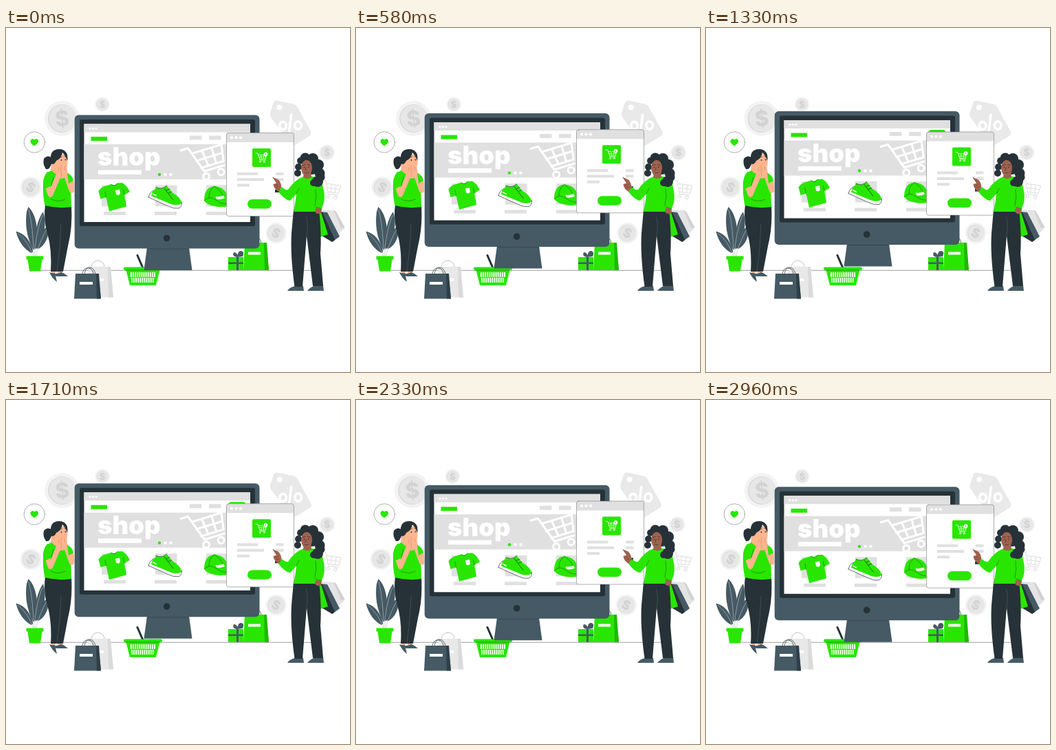
Animation, 500 px wide and 500 px high, one loop 3 s. Source, as an HTML page:

```html
<!DOCTYPE html>
<html lang="en">
<head>
<meta charset="utf-8">
<title>Online shop</title>
<style>
html, body { margin: 0; width: 100%; height: 100%; overflow: hidden; background: #fff; }
svg { display: block; width: 100%; height: 100%; }
.g { fill: #29e600; }
.s { fill: #455a64; }
.d { fill: #263238; }
.l { fill: #e0e0e0; }
.w { fill: #fff; }
.peach { fill: #ffb58e; }
.brown { fill: #a0624e; }
.line { fill: none; stroke: #263238; stroke-width: .7; stroke-linecap: round; stroke-linejoin: round; }
.thin { stroke: #777; stroke-width: .6; }
.fold { fill: none; stroke: #167d05; stroke-width: .7; stroke-linecap: round; }
text { font-family: Inter, "Open Sans", sans-serif; }
</style>
</head>
<body>
<svg viewBox="0 0 500 500">
  <defs>
    <g id="cart" fill="none" stroke-linejoin="round" stroke-linecap="round">
      <path d="M0 0H11L24 39H54M14 9H59L55 33H21M17 21H57M29 9L32 33M44 9V33"/>
      <circle cx="24.5" cy="47" r="4.5"/><circle cx="47" cy="47" r="4.5"/>
    </g>
    <g id="coin">
      <circle r="25.5" fill="#f3f3f3"/>
      <circle r="20.5" fill="#dadada"/>
      <circle cx=".8" r="19.7" fill="#e7e7e7"/>
      <text y="11" font-size="31" font-weight="800" text-anchor="middle" fill="#d3d3d3">$</text>
    </g>
  </defs>

  <path class="line" d="M36 352.3H452" style="stroke:#777"/>

  <g id="drift">
    <use href="#coin" transform="translate(81.5 131.5) rotate(-6)"/>
    <use href="#coin" transform="translate(140 111) scale(.42)"/>
    <use href="#coin" transform="translate(36 231.5) rotate(28) scale(.61)"/>
    <use href="#coin" transform="translate(392.5 298) rotate(24) scale(.6)"/>
    <use href="#coin" transform="translate(466.5 181) scale(.45)"/>
    <use href="#cart" transform="translate(459.500 221) rotate(8) scale(.48)" stroke="#e2e2e2" stroke-width="2.6"/>
    <path d="M394 105.5L418 110.500Q421 111 423 114L443 150Q445 154 441 157L420 170Q416 172 413 168L385 130Q383 127 384 123L389 108Q390.500 105 394 105.500Z" fill="#e9e9e9"/>
    <circle class="w" cx="397.500" cy="115.500" r="4"/>
    <g fill="none" stroke="#fff" stroke-width="3.600" stroke-linecap="round">
      <ellipse cx="402.500" cy="142" rx="4.800" ry="5.600"/>
      <ellipse cx="424.500" cy="141.500" rx="4.800" ry="5.600"/>
      <path d="M414.500 126L411.500 150"/>
    </g>
  </g>

  <!-- gift and bag behind the screen -->
  <path class="line" d="M354 313Q355 301 362 304Q370 303 371 313"/>
  <path class="g" d="M347 312H378L382 352H345Z"/>
  <path d="M375 312H379L382 352H376Z" fill="#1fb800"/>
  <path class="w" d="M352 325.500H370V329.500H352Z"/>
  <path class="g" d="M323 333H345V352H323Z"/>
  <path class="s" d="M323 340.500H345V343H323ZM335 333H338V352H335ZM336 333Q328 332 331 326Q335 326 336.500 330Q338 323 342 324Q347 325 344 332Z"/>

  <!-- plant -->
  <g class="s">
    <path d="M39 322Q26 295 30 267L32.500 260Q43 270 45 292Q45 310 41.500 322Z"/>
    <path d="M42 322Q41 285 54 267Q62 292 45 320Z"/>
    <path d="M37 327Q20 318 14.500 295.500Q33 300 39.500 325Z"/>
    <path d="M45 322Q45 298 62 287Q63 312 47 321Z"/>
  </g>
  <path d="M40 331Q40 292 33 264M41 331Q43 298 53 272M39 331Q34 312 17 298M43 331Q50 308 60 291" fill="none" stroke="#d7dcde" stroke-width=".5"/>
  <path d="M39.500 332V322M42 332V320M44 332L46 320" stroke="#e0e0e0" stroke-width="1.200"/>
  <path class="g" d="M29.500 331.500H54.500V336.500H52.500L50 353.500H34L31.500 336.500H29.500Z"/>

  <circle class="line thin" cx="41.300" cy="166" r="15.200"/>
  <path class="g" d="M41 171.500Q34.500 167 35.500 163.500Q38 159 41.300 162.500Q45 159 47 163.500Q48 167 41 171.500Z"/>

  <!-- surprised woman -->
  <path class="peach" d="M66 350H72L71 358H66ZM75 350H82L80 358H75Z"/>
  <path class="s" d="M68 357Q76 358 80 354.500Q86 357 90 361H73ZM63 355Q68 357 71 356L74 369Q67 364 63 355Z"/>
  <path class="d" d="M57 257H95Q97 290 90 317L83 354H65Q67 322 60 298Q54 278 57 257Z"/>
  <path d="M80 285Q79 320 74 354" fill="none" stroke="#455a64" stroke-width=".7"/>
  <path class="peach" d="M66 196L76 199L78 213Q70 214 65 208Z"/>
  <path class="g" d="M66 207Q72 214 79 213L88 209Q93 212 94 224L95 260Q76 263 56.500 258Q53 243 54 224Q55 211 66 207Z"/>
  <path class="peach" d="M68 188Q80 179 89 186Q91 200 86 209L75 209Q70 203 67 197Z"/>
  <path class="d" d="M55 190Q60 184 66 188Q68 196 64 202Q62 206 58 205Q53 198 55 190Z"/>
  <path class="d" d="M65 190Q64 179 73 176.500Q85 174 89 184Q90 189 89 193Q87 186 82 181Q80 190 73 193Q71 198 67 198Q64 196 65 190Z"/>
  <g class="d"><circle cx="80.500" cy="192" r=".9"/><circle cx="86.500" cy="191.500" r=".9"/></g>
  <path class="line" d="M78 188.500L81.500 187M85 186.500L88 188"/>
  <path d="M61 232L64.500 242L77 213M95 225L95.500 236L87 212" fill="none" stroke="#ffb58e" stroke-width="7.500" stroke-linecap="round" stroke-linejoin="round"/>
  <path class="peach" d="M72 207Q76 198 82 197Q88 199 89 206L89 215Q81 222 73 216Z"/>
  <path d="M80.500 199Q79 207 81 216M77 202L76 208M85 201L86 207" fill="none" stroke="#d98e6b" stroke-width=".7"/>
  <path class="g" d="M60 209Q67 209 69 215L66 229L55 235Q52 218 60 209ZM89 211Q97 214 98 222L91 226Z"/>
  <path class="fold" d="M66 229L69 217M66 249Q76 254 86 249"/>

  <!-- bags and basket -->
  <path class="line" d="M124 348Q125 338 134 338Q143 339 143 348" style="stroke:#aaa"/>
  <path d="M120 347H152L156 391.500H117Z" fill="#e8e8e8"/>
  <path d="M148 347H152L156 391.500H149Z" fill="#dadada"/>
  <path class="w" d="M126 364H142V368H126Z"/>
  <path class="line" d="M111 357Q113 348 119 349Q126 349 127 357M114 357Q116 347 122 348Q128 349 130 357"/>
  <path class="s" d="M101 357H134L138 393.500H99Z"/>
  <path d="M131 357H135L138 393.500H132Z" fill="#2f3f48"/>
  <path class="w" d="M107 369H126V373H107Z"/>
  <path class="g" d="M174 350H224L218 374H180Z"/>
  <path d="M181 358.500H217M182 366.500H216" fill="none" stroke="#fff" stroke-width="7" stroke-dasharray="1.800 1.300"/>
  <path d="M191 330.500L199.500 350" stroke="#263238" stroke-width="3" stroke-linecap="round"/>
  <rect class="g" x="171" y="347.500" width="56" height="4.500" rx="2"/>
  <path class="fold" d="M174 352H223"/>

  <g id="screen">
    <path class="s" d="M205 319H266L270.500 352H200.500Z"/>
    <path d="M205 320.500H266L266.200 321.500H204.800Z" fill="#37474f"/>
    <rect class="s" x="99.700" y="126.500" width="268.800" height="194" rx="6"/>
    <rect class="d" x="107" y="133" width="255" height="155" rx="3"/>
    <path class="w" d="M113.500 139.500H355V282H113.500Z"/>
    <path class="l" d="M113.500 139.500H355V151.500H113.500ZM113.500 169H355V220H113.500ZM267 156.500H284.500V162.500H267ZM295 156.500H312.500V162.500H295Z"/>
    <g class="w"><circle cx="122" cy="146" r="1.600"/><circle cx="126.500" cy="146" r="1.600"/><circle cx="131" cy="146" r="1.600"/></g>
    <path class="g" d="M123.500 158H147V164H123.500Z"/>
    <rect class="g" x="324" y="153.500" width="24" height="10" rx="3"/>
    <text class="w" x="133" y="200.500" font-size="36.500" font-weight="900">shop</text>
    <path class="w" d="M134 206.500H197V213H134Z"/>
    <circle class="g" cx="223" cy="213" r="2.200"/>
    <circle class="w" cx="231.500" cy="213" r="2.200"/><circle class="w" cx="239.500" cy="213" r="2.200"/>
    <use href="#cart" transform="translate(254 178) rotate(-17)" stroke="#fff" stroke-width="3"/>
    <path class="l" d="M139 228.500H175V259H139ZM217 228.500H248.500V259H217ZM291 228.500H323V259H291ZM142 267H174V272H142ZM216 267H248V272H216ZM291 267H323V272H291Z"/>
    <!-- shirt, shoe, cap -->
    <path class="g" d="M145 229.500L153 227Q158 230 162 225.500L169 225Q176 229 180 238L172 242.500L175 259.500L150 266.500L145.500 246L137.500 248.500L134.500 237Q138 231 145 229.500Z"/>
    <path class="fold" d="M153 227Q158 232 162 225.500M145.500 246L144 238M172 242.500L170.500 235"/>
    <path class="w" d="M159 236L165 234.500L166 241L163.500 243L160 242Z"/>
    <path class="w" d="M207 246Q209 238 215 236L240 250L255.500 253Q256 260 251 262Q244 263 236 259Z"/>
    <path class="line" d="M207 246Q209 238 215 236M207 246L236 259Q244 263 251 262Q256 260 255.500 253"/>
    <path class="g" d="M212.500 238.500Q217 234 218 231.500Q227 236 233.500 229L241.500 239Q254 246 255.500 255Q249 259 240 256L211 244Z"/>
    <path class="line" d="M218 231.500Q227 236 233.500 229M230 233L243 250M233 236L238 234M236 240L241 238"/>
    <path d="M213 241L219 244" stroke="#fff" stroke-width="1.500"/>
    <path class="g" d="M288 251Q288 231 303 230Q319 231 322 246L326 258Q315 262 303 259Q292 257 288 251Z"/>
    <path class="fold" d="M288 251Q296 243 305 250Q315 258 326 255M303 230Q294 236 295 247M303 230Q312 236 315 243"/>
    <path class="w" d="M304.500 245Q311 246 316 243.500L318 247Q312 250 306 248.500Z"/>
    <circle class="d" cx="233.700" cy="305.500" r="4.800"/>
  </g>

  <g id="popup">
    <rect class="w" x="320.500" y="152.500" width="98" height="121" rx="3"/>
    <path class="l" d="M320.500 166V155.500Q320.500 152.500 323.500 152.500H415.500Q418.500 152.500 418.500 155.500V166Z"/>
    <rect class="line thin" x="320.500" y="152.500" width="98" height="121" rx="3"/>
    <g class="w"><circle cx="328" cy="159.300" r="2.100"/><circle cx="334.500" cy="159.300" r="2.100"/><circle cx="341" cy="159.300" r="2.100"/></g>
    <rect class="g" x="358" y="175" width="27" height="27" rx="2"/>
    <use href="#cart" transform="translate(363 182) scale(.26)" stroke="#fff" stroke-width="2.800"/>
    <circle class="w" cx="377.500" cy="183.500" r="2.800"/>
    <path class="g" d="M377 182H378V185H377Z"/>
    <path class="l" d="M336 210H366V214H336ZM336 218.300H375V222.300H336ZM336 226.600H354V230.600H336ZM392 210H403.500V214H392ZM392 218.300H403.500V222.300H392Z"/>
    <path class="d" d="M391 235H403V239H391Z"/>
    <rect class="g" x="351" y="249" width="35" height="13.500" rx="6.700"/>
  </g>

  <!-- shopper -->
  <path d="M458 264L478 265L492 291L484 299Z" fill="#e4e4e4"/>
  <path d="M476 264L480 267L492.500 290L487 291Z" fill="#d2d2d2"/>
  <path class="s" d="M457 267L467 268L485 303L474 311Z"/>
  <path class="d" d="M455 267L460 268L478 308L474 311L459 302Z"/>
  <path class="g" d="M453 267L458 268L468 300L456 304Z"/>
  <path class="s" d="M409 382Q412 377 420 375H432L433 382ZM438 382Q442 377 449 374L461 374L462 382Z"/>
  <path class="d" d="M418 264H455Q459 300 457 328L461 375H446L437 302L431 376H419.500Q413 330 415 298Z"/>
  <path d="M437 302Q440 284 436 274" fill="none" stroke="#455a64" stroke-width=".7"/>
  <path class="g" d="M432 216Q447 213 456 221Q460 225 461 232Q464 244 462 254L458 265L454 267H418Q421 252 422 241L413 251Q405 250 396 238L401 231Q406 236 410 235Q419 221 432 216Z"/>
  <path class="fold" d="M422 241L426 233M450 234Q452 246 449 258M450 260L459 263"/>
  <path class="brown" d="M450 262Q456 260 459 265L457 270Q452 271 449 267Z"/>
  <g id="hair" class="d"></g>
  <path class="brown" d="M433 208H443L444 217Q438 221 432 217Z"/>
  <ellipse class="brown" cx="437" cy="203.500" rx="8" ry="11.500"/>
  <path class="d" d="M428 200Q426 188 437 188Q448 190 447 206L452 214L457 195L441 184L427 189Z"/>
  <g class="d"><circle cx="433.500" cy="202.500" r=".8"/><circle cx="440" cy="202.500" r=".8"/></g>
  <path class="line" d="M431 199.500L435 198.500M438.500 198.500L442 199.500M436 203L435 207M434.500 210.500Q437 211.500 439.500 210"/>
  <path class="brown" d="M387 216.500L396 220.500Q400 225 400.500 231L396.500 238Q389 234 388.500 227L393 225.500Z"/>
  <path d="M391 229L395 228M393 232L397 230.500" stroke="#6f3d30" stroke-width=".6"/>
</svg>
<script>
const $ = id => document.getElementById(id);

// curls as [x, y, radius]
const curls = [[435, 189, 7.5], [446, 190, 8], [454, 199, 8], [456, 211, 7.5], [453, 223, 8],
  [428, 193, 5], [425, 202, 5], [424, 211, 5], [444, 202, 11], [458, 217, 5.5], [447, 225, 5]];
$("hair").innerHTML = curls.map(([x, y, r]) => `<circle cx="${x}" cy="${y}" r="${r}"/>`).join("");

const move = (id, x, y) => $(id).setAttribute("transform", `translate(${x} ${y})`);

// Steady rise and fall, 0 to 1 and back
const bob = (t, period) => 1 - Math.abs(1 - 2 * (t % period) / period);

// Sideways shake: offsets at each tenth of the cycle, joined by straight ramps
const shakes = [0, -1, 2, -4, 4, -4, 4, -4, 2, -1, 0];
function shake(t, period) {
  const p = t % period / period * 10, i = Math.floor(p);
  return shakes[i] + (shakes[i + 1] - shakes[i]) * (p - i);
}

function draw() {
  const t = performance.now() % 3000;
  move("screen", 0, -6.2 * bob(t, 3000));
  move("popup", 0, -6.2 * bob(t, 1500));
  move("drift", 0.7 * shake(t, 1500), 0);
  requestAnimationFrame(draw);
}
draw();
</script>
</body>
</html>
```
